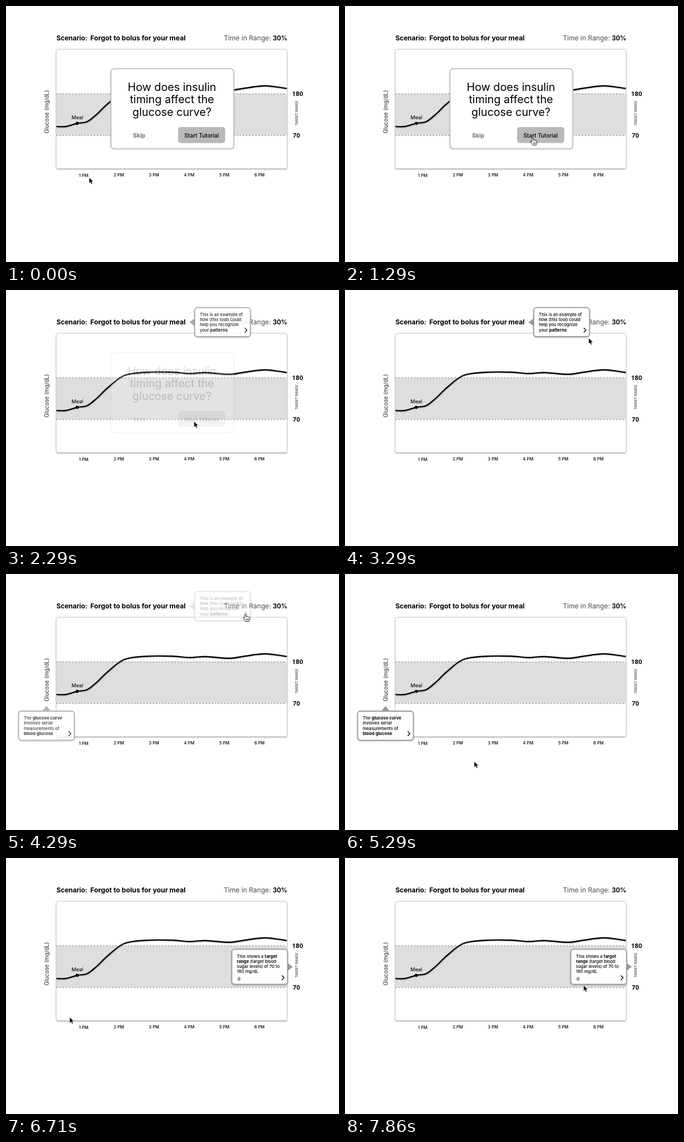
Write an HTML page that moves like this. It is 600 px wide and 461 px high and loops after 8 s.

```html
<!DOCTYPE html>
<html lang="en">
<head>
<meta charset="utf-8">
<title>Glucose tutorial</title>
<style>
  html, body { margin: 0; width: 100%; height: 100%; overflow: hidden; background: #fff; }
  svg { display: block; width: 600px; height: 461px; font-family: Montserrat, Inter, sans-serif; }
  .bold { font-weight: 700; }
  .mid { text-anchor: middle; }
  .num { font: 700 11.5px Roboto, sans-serif; }
  .axis { font-size: 7.6px; font-weight: 500; text-anchor: middle; }
  .dots { stroke: #8c8c8c; stroke-width: 2; stroke-linecap: round; stroke-dasharray: 0 5.6; }
  .title { font-size: 19.8px; }
  .note { font-size: 7.7px; font-weight: 500; }
  .box { fill: #fff; stroke: #9b9b9b; stroke-width: 1.8; }
  .shade { filter: drop-shadow(0 1px 1px #0004); }
</style>
</head>
<body>
<svg viewBox="0 0 600 461">
  <text class="bold" font-size="11.9" x="91" y="62.3">Scenario:</text>
  <text class="bold" font-size="12.25" x="152" y="62.3">Forgot to bolus for your meal</text>
  <text font-size="12.1" x="392.5" y="62.3" fill="#4c4c4c">Time in Range:</text>
  <text class="bold" font-size="11.2" x="507" y="62.3" text-anchor="end">30%</text>

  <rect x="90.5" y="78" width="416" height="215" rx="3.5" fill="#fff" stroke="#cbcbcb" class="shade"/>
  <path d="M92 293.4H505" stroke="#b9b9b9" stroke-width="1.4"/>
  <path d="M91 158H506V233H91Z" fill="#dfdde0"/>
  <path class="dots" d="M92 158.3H506M92 233.2H506"/>
  <path id="curve" class="shade" fill="none" stroke="#000" stroke-width="2.4" stroke-linejoin="round"/>
  <circle cx="128.3" cy="211.3" r="2.8"/>
  <text x="118" y="204" font-family="Roboto, sans-serif" font-size="9.7">Meal</text>

  <text class="num" x="515.5" y="162.2">180</text>
  <text class="num" x="516.7" y="237.2">70</text>
  <text transform="translate(76.5 229.5) rotate(-90)" font-size="9.9" fill="#222">Glucose (mg/dL)</text>
  <text transform="translate(525.6 215.3) rotate(-90)" font-size="5.8" font-weight="600" fill="#555">TARGET RANGE</text>
  <g id="hours"></g>

  <g id="dialog">
    <rect x="189" y="113" width="221.5" height="144.3" rx="6" fill="#fff" stroke="#b5b5b5" stroke-width="1.7"/>
    <g class="title mid">
      <text x="299" y="152.7">How does insulin</text>
      <text x="299" y="175.2">timing affect the</text>
      <text x="299" y="197.7">glucose curve?</text>
    </g>
    <text class="bold mid" x="240" y="236.7" font-size="10.2" fill="#707070">Skip</text>
    <rect x="310" y="218" width="85" height="28.7" rx="5" fill="#bab8b9"/>
    <text class="mid" x="352.5" y="236.5" font-size="10.1" font-weight="500">Start Tutorial</text>
  </g>
  <g id="tips"></g>
  <g id="cursor">
    <path id="arrow" d="M0 0V10.8L2.5 8.5 4.3 12.5 6.3 11.6 4.6 7.7H8Z" stroke="#fff" stroke-width=".8"/>
    <path id="hand" transform="translate(-.6 -.8)" d="M-1.3 9V2.8c0-1.6 2.4-1.6 2.4 0V6.3c.3-1 2.2-.9 2.3.3.4-.9 2.1-.7 2.2.5.5-.7 1.9-.4 1.9.8V11c0 1.8-1.2 2.1-1.2 3.7H.1C-.6 12.4-3.8 9.6-4 8.6c-.2-1.3 1.4-1.4 2.7.4ZM1.6 10v2.4M3.4 10v2.4M5.2 10v2.4" fill="#fff" stroke="#000" stroke-width=".9" stroke-linejoin="round"/>
  </g>
</svg>
<script>
const $ = id => document.getElementById(id);
const LOOP = 8000, FPS = 7;

// Smooth line through the turning points of the glucose curve
const turns = [
  [91, 217], [108, 217], [128, 211.3], [146, 208.4], [163, 195.5], [184, 175.5], [213, 154], [252, 148.2],
  [300, 148], [330, 150.5], [360, 148.7], [402, 151.8], [430, 148], [467, 143.7], [506, 148.6]
];
function smooth(pts) {
  const at = i => pts[Math.max(0, Math.min(pts.length - 1, i))];
  const handle = (p, a, b, s) => [0, 1].map(k => (p[k] + s * (b[k] - a[k]) / 6).toFixed(2));
  let d = `M${pts[0]}`;
  for (let i = 1; i < pts.length; i++) {
    d += `C${handle(at(i - 1), at(i - 2), at(i), 1)} ${handle(at(i), at(i - 1), at(i + 1), -1)} ${at(i)}`;
  }
  return d;
}
$('curve').setAttribute('d', smooth(turns));

$('hours').innerHTML = [1, 2, 3, 4, 5, 6].map(h =>
  `<text class="axis" x="${76.6 + h * 63.35}" y="${h === 1 ? 308 : 307}">${h} PM</text>`).join('');

const bold = s => `<tspan class="bold">${s}</tspan>`;
function tip({ x, y, h, beak, lines, info }) {
  const text = lines.map((s, i) => `<text class="note" x="${x + 9.2}" y="${y + 15.2 + i * 9.25}">${s}</text>`).join('');
  const badge = info ? `<circle cx="${x + 13}" cy="${y + h - 9.5}" r="4" fill="#cfcfcf"/>
    <text class="bold mid" font-style="italic" font-size="6.5" x="${x + 13}" y="${y + h - 7.2}">i</text>` : '';
  return `<g opacity="0"><path d="${beak}" fill="#9b9b9b"/>
    <rect class="box shade" x="${x}" y="${y}" width="100.5" height="${h}" rx="5"/>${text}${badge}
    <path d="M${x + 90.2} ${y + h - 15.8}l4 4.1-4 4.1" fill="none" stroke="#000" stroke-width="1.4"/></g>`;
}
$('tips').innerHTML = [
  { x: 340, y: 31.7, h: 52.3, beak: 'M330.5 58L340 51V65Z',
    lines: ['This is an example of', 'how (this tool) could', 'help you recognize', 'your ' + bold('patterns')] },
  { x: 22.7, y: 247, h: 52.3, beak: 'M73 237.5L80.5 247H65.5Z',
    lines: ['The ' + bold('glucose curve'), 'involves serial', 'measurements of', bold('blood glucose')] },
  { x: 406.8, y: 164.3, h: 63, beak: 'M517 196L507.5 189.5V202.5Z', info: true,
    lines: ['This shows a ' + bold('target'), bold('range') + ' (target blood', 'sugar levels) of 70 to', '180 mg/dL'] }
].map(tip).join('');
const tips = [...$('tips').children];

// All times below are in ticks of 1/7 s
const home = [149.8, 308.7];
const moves = [
  { from: 0, to: 5, at: [338.7, 236.5] },
  { from: 19, to: 23, at: [439, 86.5] },
  { from: 23, to: 26, at: [432, 71.5] },
  { from: 33, to: 37, at: [232.8, 337.5] },
  { from: 37, to: 42, at: [114.6, 286.5] },
  { from: 48, to: 53, at: [441, 234] },
  { from: 53, to: 55, at: [429.8, 229] }
];
const hovers = [[7, 14], [26, 31], [44, 47]];
const fades = [{ from: 14, steps: 5 }, { from: 30, steps: 2 }, { from: 46, steps: 2 }];

const clamp = v => Math.max(0, Math.min(1, v));
const easeInOut = k => (1 - Math.cos(Math.PI * k)) / 2;
const easeOut = k => 1 - (1 - k) ** 2;

function pointer(tick) {
  return moves.reduce((pos, { from, to, at }) => {
    const k = easeInOut(clamp((tick - from) / (to - from)));
    return pos.map((v, i) => v + (at[i] - v) * k);
  }, home);
}
function draw(ms) {
  const tick = Math.floor((ms + 5) * FPS / 1000);
  const mix = fades.map(({ from, steps }) => easeOut(clamp((tick - from + 1) / steps)));
  $('dialog').setAttribute('opacity', 1 - mix[0]);
  tips.forEach((el, n) => el.setAttribute('opacity', mix[n] * (1 - (mix[n + 1] ?? 0))));
  const hand = hovers.some(([a, b]) => tick >= a && tick < b);
  $('hand').style.display = hand ? '' : 'none';
  $('arrow').style.display = hand ? 'none' : '';
  $('cursor').setAttribute('transform', `translate(${pointer(tick)})`);
}
const began = performance.now();
function loop() {
  draw((performance.now() - began) % LOOP);
  requestAnimationFrame(loop);
}
loop();
</script>
</body>
</html>
```
